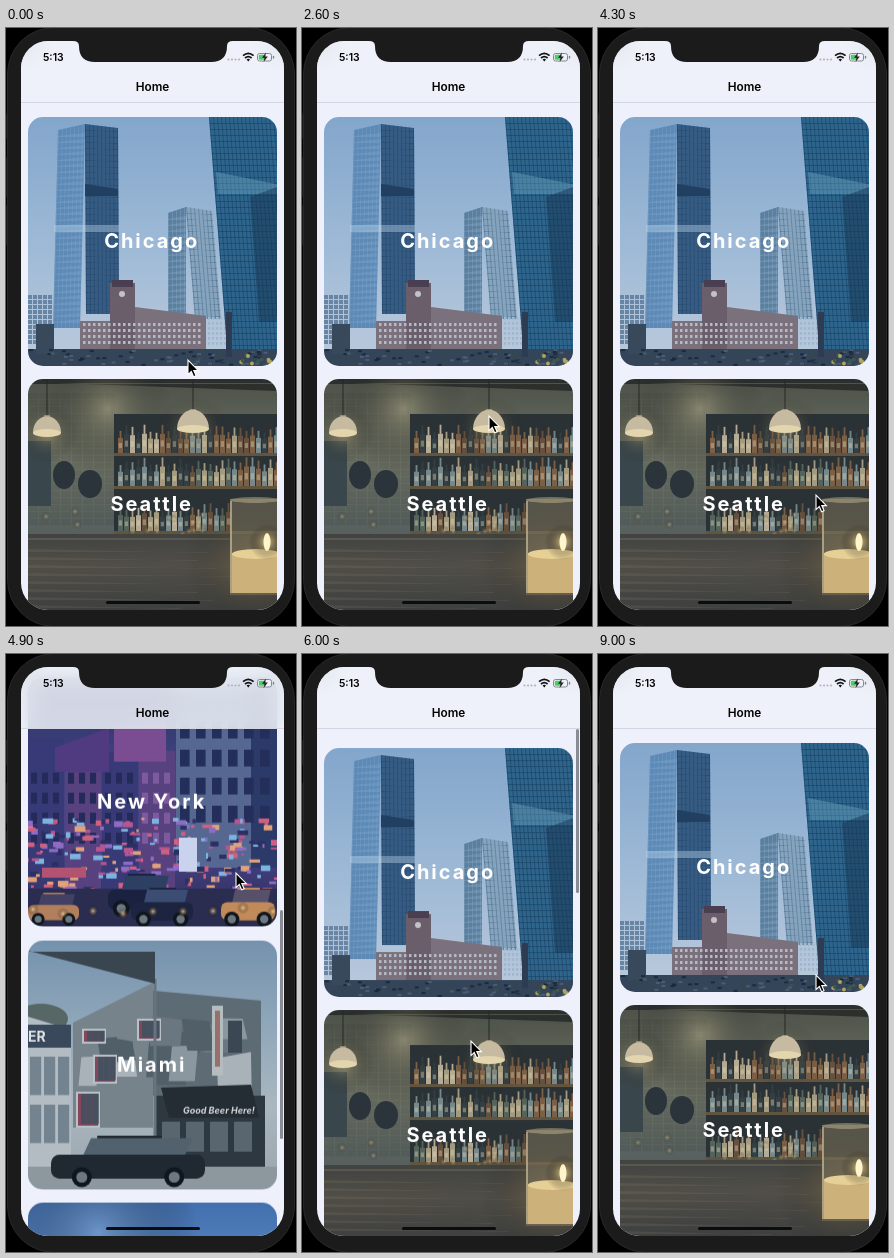
Recreate the animation shown at these times as an HTML page with a canvas. Size 290 px wide and 598 px high, loop 9100 ms.

```html
<!DOCTYPE html>
<html lang="en">
<head>
<meta charset="utf-8">
<title>Flip cards</title>
<style>
html, body { margin: 0; width: 100%; height: 100%; overflow: hidden; background: #000; }
body { position: relative; font-family: Inter, Roboto, sans-serif; }
div, h2, p, canvas, svg { position: absolute; margin: 0; }
#stage { left: 0; top: 0; width: 290px; height: 598px; overflow: hidden; background: #000; }
.key { left: 0; width: 4px; background: #191919; border-radius: 2px; }
#phone { left: 1px; top: -1px; width: 286px; height: 598px; border: 1px solid #282828; border-radius: 47px; background: #1b1b1b; }
#screen { left: 15px; top: 13px; width: 263px; height: 569px; border-radius: 27px; overflow: hidden; background: #eef0fb; }
#list { left: 7px; top: 75.5px; width: 249px; }
.card { width: 249px; height: 249px; perspective: 650px; }
.flip { width: 249px; height: 249px; transform-style: preserve-3d; }
.face { width: 249px; height: 249px; border-radius: 15px; overflow: hidden; backface-visibility: hidden; }
.back { background: #fff; transform: rotateY(180deg); }
h2 { left: -.8px; top: 112.5px; width: 249px; text-align: center; font: 700 20px/24px Inter, Roboto, sans-serif; letter-spacing: 2px; color: #fff; }
.text { left: 0; top: 57px; width: 249px; text-align: center; font-size: 10.6px; line-height: 20.4px; color: #000; white-space: nowrap; }
.link { left: 0; top: 165.4px; width: 249px; text-align: center; font-size: 9.3px; line-height: 12px; color: #24527a; }
#head { left: 0; top: 0; width: 263px; height: 61px; background: rgba(238,241,249,.86); backdrop-filter: blur(10px); border-bottom: 1px solid #d3d6e1; }
#title { left: 0; top: 39px; width: 263px; text-align: center; font-size: 11.8px; line-height: 14px; font-weight: 600; }
#clock { left: 22px; top: 9.7px; font-size: 10.4px; line-height: 13px; font-weight: 600; }
#bar { left: 259px; width: 2.5px; border-radius: 2px; background: rgba(70,73,82,.6); }
#home { left: 85px; top: 560px; width: 94px; height: 3.4px; border-radius: 2px; background: #0b0c0e; }
#over, #cursor { left: 0; top: 0; }
</style>
</head>
<body>
<div id="stage">
  <div class="key" style="top:85px;height:27px"></div>
  <div class="key" style="top:128px;height:42px"></div>
  <div class="key" style="top:176px;height:42px"></div>
  <div id="phone"></div>
  <div id="screen">
    <div id="list"></div>
    <div id="head"><p id="clock">5:13</p><p id="title">Home</p></div>
    <div id="bar"></div>
    <div id="home"></div>
  </div>
  <svg id="over" width="290" height="598">
    <path d="M67 12H227V13Q221 13 221 18Q221 34 205 34H89Q73 34 73 18Q73 13 67 13Z" fill="#1b1b1b"/>
    <path d="M222.5 31.5H234" stroke="#b3b5be" stroke-width="2.2" stroke-linecap="round" stroke-dasharray="0 3.5"/>
    <g fill="none" stroke="#111" stroke-width="1.7"><path d="M237 27.6Q242.3 23 247.6 27.6"/><path d="M239 30Q242.3 27.2 245.6 30"/></g>
    <path d="M240.6 31.4Q242.3 30 244 31.4L242.3 33.4Z" fill="#111"/>
    <rect x="251.5" y="25.5" width="14" height="7.5" rx="2" fill="#eef0fb" stroke="#85878f"/>
    <rect x="252.8" y="26.7" width="6.5" height="5.1" rx="1" fill="#4fcb64"/>
    <path d="M260 24.5L256 29.8H258.5L257.6 34L261.8 28.6H259.2Z" fill="#222"/>
    <rect x="266.8" y="27.7" width="1.4" height="3" rx=".7" fill="#85878f"/>
  </svg>
  <svg id="cursor" width="16" height="22" viewBox="-2 -2 16 22">
    <path d="M0 0V14.6L3.3 11.5L5.6 16.8L8.1 15.7L5.8 10.6H10.4Z" fill="#000" stroke="#fff" stroke-width="1.1"/>
  </svg>
</div>
<script>
const SIZE = 249, PITCH = 262.7, LOOP = 9100;
const $ = id => document.getElementById(id);
let g, seed = 7;

function rnd(a = 0, b = 1) {
  seed = (seed * 16807) % 2147483647;
  return a + (b - a) * seed / 2147483647;
}
const pick = list => list[Math.floor(rnd(0, list.length))];

function rect(c, x, y, w, h) {
  g.fillStyle = c;
  g.fillRect(x, y, w, h);
}
// leaning wall: skew tilts its top edge, lean moves its foot sideways
function slab(c, x, y, w, h, skew = 0, lean = 0) {
  g.fillStyle = c;
  g.beginPath();
  g.moveTo(x, y);
  g.lineTo(x + w, y + skew);
  g.lineTo(x + w + lean, y + h);
  g.lineTo(x + lean, y + h);
  g.fill();
}
function oval(c, x, y, rx, ry = rx, from = 0) {
  g.fillStyle = c;
  g.beginPath();
  g.ellipse(x, y, rx, ry, 0, from, Math.PI * 2);
  g.fill();
}
function fade(...colors) {
  const f = g.createLinearGradient(0, 0, 0, SIZE);
  colors.forEach((c, i) => f.addColorStop(i / (colors.length - 1), c));
  return f;
}
function glow(c, x, y, r) {
  const f = g.createRadialGradient(x, y, 0, x, y, r);
  f.addColorStop(0, c);
  f.addColorStop(1, "transparent");
  rect(f, x - r, y - r, r * 2, r * 2);
}
function panes(c, x, y, w, h, dx, dy, fill = .55) {
  for (let j = 0; j + dy <= h; j += dy)
    for (let i = 0; i + dx <= w; i += dx) rect(c, x + i, y + j, dx * fill, dy * fill);
}
function tower(c, ink, x, y, w, h, skew, lean) {
  slab(c, x, y, w, h, skew, lean);
  for (let i = 0; i < w; i += 4) slab(ink, x + i, y + skew * i / w, 1, h - skew * i / w, 0, lean);
  for (let j = 6; j < h; j += 6) slab(ink, x + lean * j / h, y + j, w, 1, skew / 2);
}

function chicago() {
  rect(fade("#83a6cb", "#9db9d6", "#bccadc"), 0, 0, SIZE, SIZE);
  panes("#6885a3", 0, 178, 26, 50, 5, 5, .8);
  tower("#5c89b5", "rgba(130,170,205,.35)", 30, 13, 27, 198, -6, -5);
  tower("#365c83", "rgba(25,55,90,.35)", 57, 7, 33, 190, 4, 1);
  slab("#213f60", 57, 67, 33, 12, 5);
  slab("rgba(190,215,235,.4)", 26, 108, 65, 7);
  tower("#5b7f9f", "rgba(150,180,205,.3)", 140, 96, 18, 104, -6, 0);
  tower("#86a4be", "rgba(55,90,120,.4)", 158, 90, 26, 112, 4, 9);
  panes("#9fb8cd", 176, 200, 24, 30, 4, 5);
  tower("#2e658c", "rgba(20,55,85,.45)", 181, 0, 85, 243, 0, 19);
  slab("rgba(125,180,205,.35)", 188, 55, 70, 22, 14, 2);
  slab("rgba(25,55,85,.5)", 222, 80, 40, 125, -15, 9);
  rect("#7b717c", 52, 204, 126, 30);
  slab("#7b717c", 107, 190, 71, 14, 9);
  rect("#6a5e6b", 82, 166, 25, 68);
  slab("#493f50", 84, 163, 21, 7);
  oval("#c3c3c7", 94, 177, 3);
  panes("#b4bac5", 55, 206, 122, 26, 5, 6, .5);
  rect("#344559", 0, 232, SIZE, 17);
  rect("#39495c", 8, 207, 18, 30);
  rect("#2d3c52", 198, 195, 6, 45);
  for (let i = 0; i < 90; i++) rect(pick(["#1b2a41", "#4b5d70", "#33484b"]), rnd(0, SIZE), rnd(232, 247), 4, 2);
  for (let i = 0; i < 12; i++) oval(pick(["#b0a35f", "#40564f"]), rnd(203, 246), rnd(237, 247), 2);
}

function bottles(x0, x1, base) {
  for (let x = x0; x < x1; x += 6) {
    const c = pick(["#a39a80", "#66503f", "#b5ab94", "#54645c", "#7b6047", "#77888a", "#343f43"]), h = rnd(20, 29);
    rect(c, x, base - h * .68, 5, h * .68);
    rect(c, x + 1.6, base - h, 1.8, h * .4);
    rect("rgba(225,213,178,.4)", x + .8, base - h * .45, 3.2, h * .22);
  }
}
function lamp(x, y, r) {
  rect("#25292a", x - .5, 0, 1, y - r);
  glow("rgba(237,211,145,.35)", x, y, r * 2.2);
  rect("#988e77", x - 3, y - r - 4, 6, 7);
  oval("#c6baa0", x, y, r, r * 1.2, Math.PI);
  oval("#e3d5ae", x, y, r, 4);
}
function seattle() {
  rect(fade("#4c5149", "#6f7365", "#535d5e", "#3c484e"), 0, 0, SIZE, SIZE);
  panes("rgba(35,45,45,.12)", 0, 14, 90, 136, 11, 7, .9);
  slab("#2b302d", 0, 0, SIZE, 4, 0);
  slab("#2b302d", 0, 3, SIZE, 2, 9);
  glow("rgba(200,190,150,.45)", 80, 30, 65);
  rect("#2b3236", 86, 35, 163, 124);
  [74, 107, 152].forEach((y, i) => {
    bottles(90, i < 2 ? SIZE : 203, y);
    rect("#62553f", 86, y, 163, 3);
  });
  rect("#39464b", 0, 62, 23, 65);
  oval("#2a343a", 36, 96, 11, 14);
  oval("#2a343a", 62, 105, 12, 14);
  for (let i = 0; i < 16; i++) glow("rgba(225,205,155,.45)", rnd(10, 200), rnd(132, 156), 5);
  lamp(19, 54, 14);
  lamp(165, 50, 16);
  rect(fade("#2c3335", "#2c3335", "#33393a", "#504e48", "#363a3b"), 0, 155, SIZE, 94);
  rect("#5a574e", 0, 159, 203, 2);
  for (let y = 170; y < SIZE; y += 8) slab("rgba(160,142,112,.14)", 0, y, rnd(120, 249), 3, 4);
  glow("rgba(195,155,85,.35)", 226, 185, 70);
  rect("rgba(125,115,92,.55)", 202, 120, 47, 96);
  rect("#cdb17a", 204, 174, 45, 40);
  oval("#e6d096", 228, 175, 24, 5);
  rect("rgba(235,222,185,.5)", 202, 122, 2, 92);
  oval("rgba(205,190,150,.45)", 227, 121, 25, 3);
  glow("rgba(255,228,147,.8)", 239, 163, 18);
  oval("#fff5cc", 239, 163, 3.5, 9);
}

function car(c, x, y, w, h, glass) {
  slab(c, x + w * .3, y, w * .42, h * .5);
  slab(glass, x + w * .2, y + h * .45, w * .66, -h * .4, 0, w * .06);
  g.fillStyle = c;
  g.beginPath();
  g.roundRect(x, y + h * .38, w, h * .48, h * .17);
  g.fill();
  for (const p of [.2, .8]) {
    oval("#10161d", x + w * p, y + h * .83, h * .2);
    oval("#6c7782", x + w * p, y + h * .83, h * .11);
  }
}
function newYork() {
  rect(fade("#28315f", "#3f4280", "#494489", "#2a2b55"), 0, 0, SIZE, SIZE);
  for (let x = 0; x < 148; x += 37) {
    rect(pick(["#373a76", "#57427f", "#444a8a"]), x, rnd(50, 90), 36, 140);
    panes(pick(["#7d5a9e", "#242b5a", "#8a5790"]), x + 3, 95, 34, 90, 11, 20);
  }
  rect("#566892", 148, 0, 75, 190);
  rect("#2b3a68", 223, 0, 26, 190);
  panes("#232f5a", 152, 16, 96, 155, 16, 28, .6);
  slab("#503a80", 27, 70, 54, 24, -20);
  slab("#7a4d92", 86, 50, 52, 34, -5);
  for (let i = 0; i < 220; i++)
    rect(pick(["#b4568f", "#8f6bc4", "#7cb4e0", "#d0607f", "#e0a27c", "#2c2f63"]), rnd(-5, SIZE), rnd(140, 212), rnd(2, 11), rnd(2, 6));
  rect("#c9d3ee", 151, 160, 18, 34);
  rect("#b25372", 14, 190, 44, 10);
  rect("#2a2c50", 0, 211, SIZE, 38);
  car("#b27f5c", 0, 215, 51, 32, "#424164");
  car("#1b2140", 80, 196, 66, 42, "#2d4063");
  car("#1d2440", 103, 210, 62, 38, "#3b4d73");
  car("#c18a58", 193, 210, 54, 38, "#56506a");
  for (let i = 0; i < 9; i++) glow("rgba(255,215,160,.8)", 5 + i * 30, rnd(226, 238), 6);
}

function miami() {
  rect(fade("#7592ad", "#8fa7ba", "#aab7c0", "#9aa4ab"), 0, 0, SIZE, SIZE);
  oval("#566766", 13, 78, 27, 15);
  slab("#76838b", 45, 82, 80, 105, -40);
  slab("#5d6b74", 125, 50, 108, 105, 10);
  for (let i = 0; i < 14; i++)
    slab(pick(["#a9b2b8", "#8b979f", "#6a7780", "#515f69"]), rnd(48, 195), rnd(62, 125), rnd(18, 36), rnd(20, 36), rnd(-8, 6), rnd(-4, 6));
  for (let i = 0; i < 4; i++) {
    const x = [56, 111, 67, 50][i], y = [90, 80, 116, 153][i], h = 11 + i * 7;
    rect("#b9c1c6", x - 2, y - 2, 24, h + 4);
    rect("#85465c", x, y, 20, h);
    panes("#46505f", x + 3, y, 18, h, 6, h, .95);
  }
  rect("#3a4853", 200, 80, 14, 32);
  rect("#b5bcbf", 184, 65, 11, 70);
  rect("#96716c", 187, 70, 5, 56);
  slab("#b3bcc3", 0, 76, 43, 155, 13);
  rect("#39495b", 0, 84, 43, 23);
  g.font = "700 14px Inter, sans-serif";
  g.fillStyle = "#e2e5e8";
  g.fillText("ER", 0, 101);
  panes("#73838f", 2, 116, 42, 100, 14, 48, .8);
  rect("#2e3841", 126, 155, 111, 73);
  slab("#242c34", 133, 147, 90, 30, -3, 8);
  panes("#59666f", 134, 181, 100, 42, 24, 40, .75);
  g.font = "italic 700 9px Inter, sans-serif";
  g.fillStyle = "#d2d7da";
  g.fillText("Good Beer Here!", 155, 173);
  rect("#66747e", 125.5, 38, 3, 186);
  slab("#39454f", 0, 10, 127, 1, 33);
  rect("#8d979e", 0, 226, SIZE, 23);
  car("#202932", 23, 195, 154, 50, "#51616d");
}

function sky() {
  rect(fade("#426fae", "#6f9bd2", "#b3c7df"), 0, 0, SIZE, SIZE);
  glow("rgba(130,168,215,.6)", 70, 30, 100);
}

function addCard([paint, name], i) {
  const card = document.createElement("div");
  card.className = "card";
  card.style.top = i * PITCH + "px";
  card.innerHTML = `<div class="flip"><div class="face"><canvas width="${SIZE}" height="${SIZE}"></canvas><h2>${name}</h2></div>
    <div class="face back"><p class="text">Lorem ipsum dolor sit amet, consectetur<br>adipiscing elit, sed do eiusmod tempor<br>incididunt ut labore et dolore magna<br>aliqua.</p><p class="link">View Details</p></div></div>`;
  $("list").append(card);
  g = card.querySelector("canvas").getContext("2d");
  paint();
  return card.querySelector(".flip");
}
const cards = [[chicago, "Chicago"], [seattle, "Seattle"], [newYork, "New York"], [miami, "Miami"], [sky, ""]].map(addCard);

const clamp = v => Math.max(0, Math.min(1, v));
const span = (t, a, b) => clamp((t - a) / (b - a));
const smooth = p => p * p * (3 - 2 * p);
const easeOut = p => 1 - (1 - p) ** 3;

// time, x, y
const path = [
  [0, 182, 332], [600, 180, 290], [1700, 180, 290], [2600, 187, 388], [4300, 218, 467],
  [4900, 230, 219], [5300, 230, 219], [6000, 169, 387], [6600, 159, 269], [8200, 159, 269], [9000, 218, 321]
];
function pointer(t) {
  const i = Math.max(1, path.findIndex(k => t <= k[0])), a = path[i - 1], b = path[i];
  const p = smooth(span(t, a[0], b[0]));
  return [a[1] + (b[1] - a[1]) * p, a[2] + (b[2] - a[2]) * p];
}

const END = 855, VIEW = 474;
function scroll(t) {
  const down = smooth(span(t, 4500, 5135)), up = smooth(span(t, 5350, 5850));
  const settle = smooth(span(t, 5850, 6200));
  return END * (down - up) - 8.3 * (up - settle);
}
const barTop = t => 62 + Math.max(0, scroll(t)) * VIEW / (END + VIEW);

const flip = (t, open, close) => easeOut(span(t, open, open + 500)) - easeOut(span(t, close, close + 500));
const turn = (card, p) => card.style.transform = `rotateY(${180 * p}deg)`;

function draw(now) {
  const t = Math.floor((now % LOOP) / 100) * 100;
  const [x, y] = pointer(t), off = scroll(t), bar = $("bar").style;
  $("list").style.transform = `translateY(${-off}px)`;
  $("cursor").style.transform = `translate(${x - 2}px, ${y - 2}px)`;
  // a fast bar smears over its way
  const smear = Math.abs(barTop(t + 45) - barTop(t - 45));
  bar.top = barTop(t) - smear / 2 + "px";
  bar.height = 169 + Math.min(0, off) + smear + "px";
  bar.opacity = t > 4500 ? 1 - span(t, 6200, 6500) : 0;
  turn(cards[0], flip(t, 600, 1600) + flip(t, 6600, 8000));
  turn(cards[1], flip(t, 2800, 3700));
}
const start = performance.now();
function tick() {
  draw(performance.now() - start);
  requestAnimationFrame(tick);
}
tick();
</script>
</body>
</html>
```
